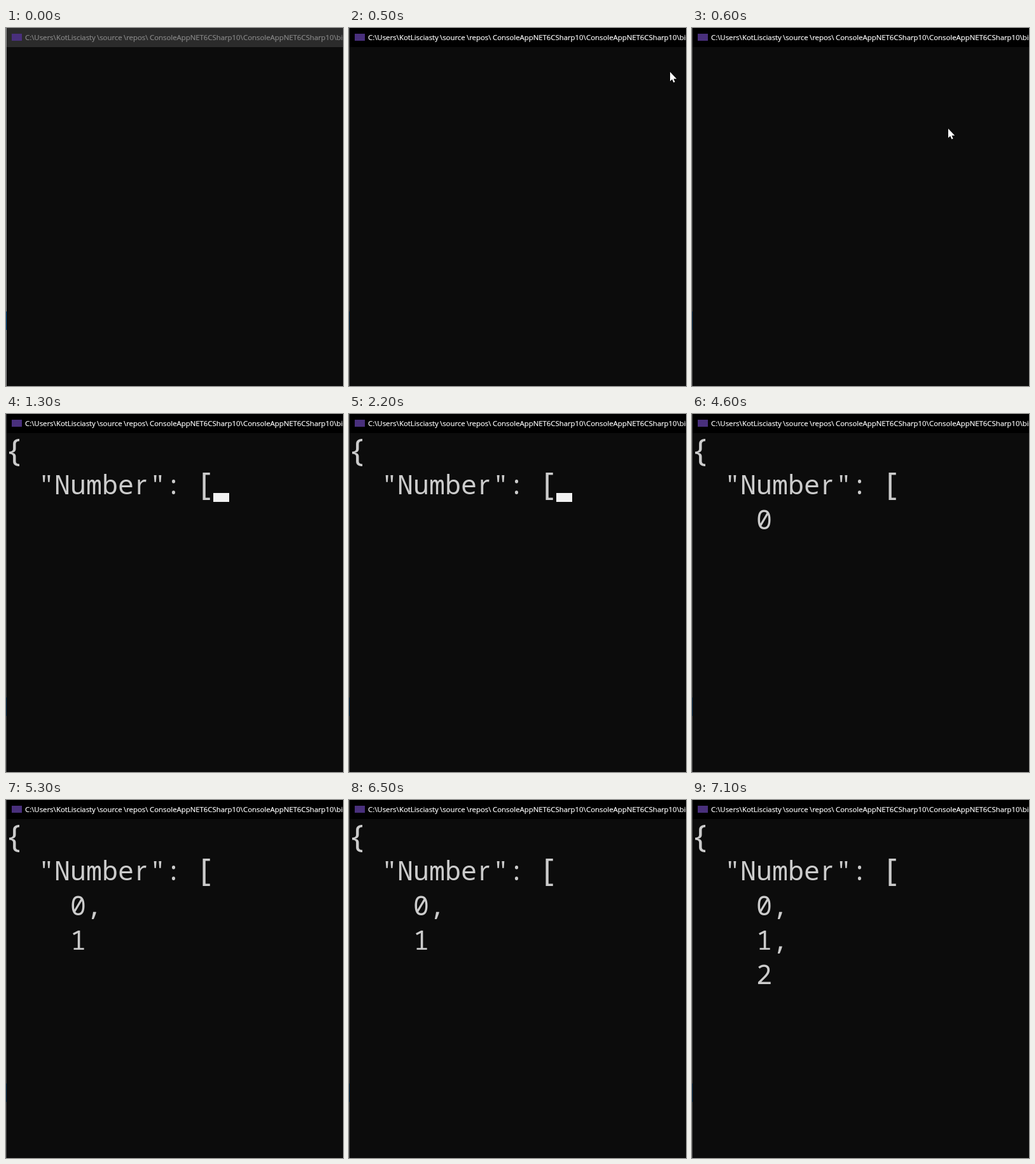
Animation of 530 by 562 pixels, one loop 8000 ms. Source, as an HTML page:

```html
<!DOCTYPE html>
<html lang="en">
<head>
<meta charset="utf-8">
<title>Console</title>
<style>
  html, body { margin: 0; width: 100%; height: 100%; overflow: hidden; background: #0c0c0c; }
  svg { display: block; }
  .out { font: 41.66px "Noto Sans Mono", monospace; fill: #ccc; }
  .brace { font-size: 50px; font-weight: 300; }
  .plain { font-family: "Noto Sans", sans-serif; }
  .title { font: 11.36px "Open Sans", "Noto Sans", sans-serif; fill: currentColor; stroke: currentColor; stroke-width: .2px; }
</style>
</head>
<body>
<svg width="530" height="562" viewBox="0 0 530 562">
  <rect width="530" height="562" fill="#0c0c0c"/>
  <rect id="edge" width="1" height="562"/>
  <rect id="edgeBlue" y="445" width="1" height="29"/>
  <rect id="bar" x="1" width="529" height="30"/>
  <rect x="9" y="9" width="16" height="11" fill="#49307c"/>
  <g id="title" class="title">
    <text x="30" y="19">C:\Users\</text>
    <text x="79" y="19">KotLisciasty</text>
    <text x="143" y="19">\source</text>
    <text x="185" y="19">\repos\</text>
    <text x="226" y="19">ConsoleAppNET6CSharp10\</text>
    <text x="373" y="19">ConsoleAppNET6CSharp10\bin\</text>
  </g>
  <g id="out" class="out">
    <text class="brace" x="-2" y="73.5">{</text>
    <text x="51" y="126">"Numbe<tspan class="plain" x="204">r</tspan><tspan x="226">":</tspan></text>
    <text class="brace" x="297.5" y="127">[</text>
    <g id="items"></g>
  </g>
  <rect id="caret" width="25" height="14" fill="#f2f2f2"/>
  <path id="mouse" d="M0 0V14.6L3.2 11.6L5.4 16.6L7.6 15.7L5.5 10.8H10.2Z" fill="#fff"/>
</svg>
<script>
const LOOP = 8000, ROW = 54;
const ACTIVE_AT = 500, TEXT_AT = 1200;
const itemTimes = [3200, 5100, 7000];
// the caret switches on, off, on, ... at these times
const blinks = [1300, 1600, 2200, 2700, 3200, 3400, 4100, 4600, 5100, 5300, 6100, 6500, 7000, 7100];
const mouseStops = [[100, 505, 69], [600, 403, 158], [700, 436, 167]];

const el = id => document.getElementById(id);
const paint = (id, color) => {
  el(id).setAttribute("fill", color);
  el(id).style.color = color;
};
const show = (node, on) => node.setAttribute("visibility", on ? "visible" : "hidden");
const move = (id, x, y) => el(id).setAttribute("transform", `translate(${x} ${y})`);

function addText(text, x, y) {
  const node = document.createElementNS("http://www.w3.org/2000/svg", "text");
  node.setAttribute("x", x);
  node.setAttribute("y", y);
  node.textContent = text;
  return el("items").appendChild(node);
}

const items = itemTimes.map((time, i) => ({
  time,
  digit: addText(i, 101, 180.5 + i * ROW),
  comma: addText(",", 126, 180.5 + i * ROW)
}));

function draw(t) {
  const active = t >= ACTIVE_AT;
  paint("bar", active ? "#000" : "#2b2b2b");
  paint("title", active ? "#fff" : "#888");
  paint("edge", active ? "#484848" : "#9a9a9a");
  paint("edgeBlue", active ? "#0f3656" : "#0a5a9c");

  const stop = mouseStops.filter(s => s[0] <= t).pop();
  show(el("mouse"), stop && t < TEXT_AT);
  if (stop) move("mouse", stop[1], stop[2]);

  show(el("out"), t >= TEXT_AT);
  items.forEach(({ time, digit, comma }, i) => {
    show(digit, t >= time);
    show(comma, t >= itemTimes[i + 1]);
  });

  const count = itemTimes.filter(time => time <= t).length;
  move("caret", count ? 126 : 326, 124 + count * ROW);
  show(el("caret"), blinks.filter(time => time <= t).length % 2);
}

const start = performance.now();
function tick() {
  draw((performance.now() - start) % LOOP);
  requestAnimationFrame(tick);
}
tick();
</script>
</body>
</html>
```
